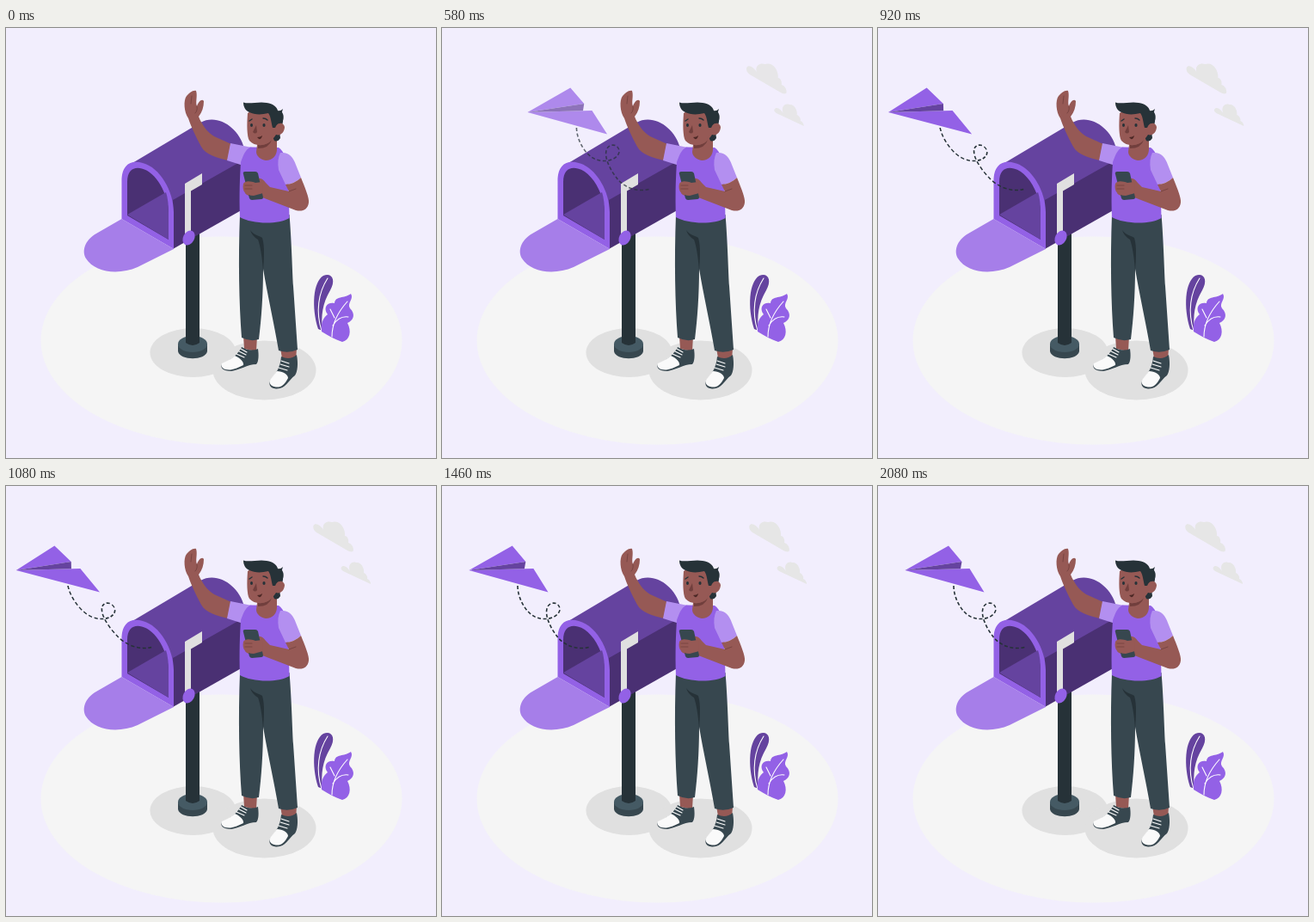
These frames come from a looping animation (500 px wide and 500 px high, 2.12 s). An HTML page:

```html
<!DOCTYPE html>
<html lang="en">
<head>
<meta charset="utf-8">
<style>
html, body { margin: 0; width: 100%; height: 100%; overflow: hidden; background: #f2eefd; }
svg { display: block; width: 100vw; height: 100vh; }
.base { fill: #9361e6; } .mid { fill: #65439f; } .deep { fill: #4a3073; } .pale { fill: #a67ee9; }
.ink { fill: #263238; } .slate { fill: #37474f; } .steel { fill: #455a64; }
.skin { fill: #965955; } .shade { fill: #713f3d; }
.white { fill: #fafafa; } .grey { fill: #e0e0e0; } .sleeve { fill: #b38ff0; }
.line { fill: none; stroke: #fff; stroke-width: 1.1; stroke-linecap: round; }
.thin { fill: none; stroke: #713f3d; stroke-width: .8; stroke-linecap: round; }
.hairline { fill: none; stroke: #263238; stroke-width: 1.4; stroke-linecap: round; }
</style>
</head>
<body>
<svg viewBox="0 0 500 500">
  <ellipse cx="250.5" cy="363.5" rx="210" ry="121" fill="#f5f5f5"/>
  <ellipse class="grey" cx="217.500" cy="377.500" rx="50" ry="28.500"/>
  <ellipse class="grey" cx="300.500" cy="398" rx="60" ry="34.500"/>

  <g id="clouds" fill="#e6e6e6">
    <path d="M357.500 46C360 42 366 46 369 51C367 44 373 40 379 42C388 39 395 49 394 58C397 58 399 63 398 66C402 67 405 72 403.500 76C401 77 399 76 397 75L361 54C357 51 357 48 357.500 46Z"/>
    <path d="M389.500 95C392 90 398 95 400 99C397 92 402 87 407 89C413 88 417 96 416 101C419 102 421 106 420 108C423 109 424 112 424 114L392 99Q389 97 389.500 95Z"/>
  </g>

  <!-- plant -->
  <path class="mid" d="M363 350C355 325 357 295 369 288C379 284 384 293 377 305C368 320 366 335 368 352Z"/>
  <path class="line" d="M367 352C360 330 363 308 374 291"/>
  <path class="base" d="M367 353C366 342 369 337 374 333C368 325 374 318 382 320C383 311 393 315 401 309C405 315 396 320 400 326C407 333 404 340 397 343C402 352 400 363 391 365C382 362 375 358 367 353Z"/>
  <path class="line" d="M379 359C379 343 387 329 397 318M382 337L377 327M380 346C385 338 391 335 398 336"/>

  <!-- post -->
  <path class="slate" d="M200 368V376C202 387 232 387 234 376V368Z"/>
  <ellipse class="steel" cx="217" cy="367.500" rx="17" ry="9.500"/>
  <path class="ink" d="M209 230H225V366Q217 372 209 366Z"/>

  <!-- mailbox -->
  <path class="mid" d="M142 160L226 110C246 99 271 116 277 140V160L194 206L160 170Z"/>
  <path class="deep" d="M194 200L277 153V210L194 257Z"/>
  <path class="base" d="M134.500 222V178C134.500 158 146 153 159 157C179 162 195 190 195 214V257Z"/>
  <path class="deep" d="M141 218V179C141 165 149 161 158 163.500C174 167 189 193 189 215V246Z"/>
  <path class="mid" d="M141 217L186 191Q189 200 189 215V246Z"/>
  <path class="pale" d="M134.500 222L105 239C91 247 88 260 93 268C103 284 130 288 153 278L195 257Z"/>
  <path class="grey" d="M208 181L228 169V182L215 189.500V238L208 242Z"/>
  <ellipse class="base" cx="212.500" cy="244" rx="6.500" ry="9" transform="rotate(28 212.500 244)"/>

  <g id="plane">
    <path d="M88 116C88 130 97 148 110 153C125 158 137 150 137 143C136 135 127 134 123 140C118 149 126 165 133 174C140 184 155 192 172 187" fill="none" stroke="#263238" stroke-width="1.600" stroke-dasharray="4 2.600"/>
    <path class="base" d="M31.500 98L82 69.500L97.500 88ZM31.500 98L106.500 96L123.500 123.500Z"/>
    <path class="mid" d="M31.500 98L97.500 88L96 96.300Z"/>
  </g>

  <!-- shoes -->
  <path class="skin" d="M276 358H292L291 376L277 373ZM319 372H338L337 388L321 384Z"/>
  <path class="slate" d="M274 371Q284 377 293 373C294 380 294 388 291 391C281 391 271 398 262 399C252 399 249 395 251 391C262 386 270 379 274 371ZM320 382Q330 387 338 380C340 390 339 400 336 404C328 410 325 420 314 419.500C306 419 305 413 308 409C315 401 319 393 320 382Z"/>
  <path class="white" d="M266 381C273 384 277 389 276 392C270 395 265 397 261 397.500C253 398 249 394 251 390C257 387 262 385 266 381ZM315 399C322 399 328 403 328 407C324 415 320 418 314 417.500C307 417 305 412 308 408Z"/>
  <path class="line" d="M268 379L277 383M271 376L279 380M273 373L280 377M317 395L327 398M319 391L329 394M320 387L329 390"/>

  <!-- trousers -->
  <path class="slate" d="M272 217H329.500C332 245 333 285 334 300L339 374Q328 379 317 375C312 345 304 310 299 280C299 310 297 338 294 362Q284 365 274 360C271 320 270 270 272 217Z"/>
  <path class="ink" d="M284 235C288 241 294 241 298 244C301 254 300 268 299 283C298 268 296 254 293 246Q286 242 284 235Z"/>

  <!-- body -->
  <path class="skin" d="M262 135L258 154C245 151 232 147 227 138C220 125 215 114 212 105C207 98 206 84 210 79C213 76 217 72 221 73C223 79 220 86 222 91C224 85 228 82 230 85C230 92 228 98 224 103C228 113 234 121 242 126Z"/>
  <path class="thin" d="M216 79L215 88M222 91Q223 96 220 99"/>
  <path class="sleeve" d="M261 134L286 139L276 160L257 154Z"/>
  <path class="base" d="M284 138.500L317 139C323 143 328 155 328 165L329.500 221C316 229 286 228 272 220C271 195 272 172 273 156C276 148 278 142 284 138.500Z"/>
  <path class="sleeve" d="M319 145C329 144 334 150 337 159L343 174Q336 181 325 182L317 165Q315 153 319 145Z"/>
  <path class="skin" d="M293 128H315V141C315 148 310 154 302 154C296 153 291 149 291 144Z"/>
  <path class="shade" d="M293 136Q304 137 309 130Q306 140 293 140Z"/>
  <path class="skin" d="M325 182Q336 181 343 174C347 184 353 198 352 203C351 211 345 214 337 212L298 197C290 198 281 196 278 192L292 175Q298 174 302 180L307 185L329 190Z"/>
  <path class="slate" d="M278 167L290 167Q292 167 293 169L299 197Q299 199 297 199L286 200Q284 200 283 198L276 170Q275 167 278 167Z"/>
  <path class="skin" d="M276 181C278 177 285 178 290 180L298 179L299 192L288 195C279 195 274 190 276 181Z"/>
  <path class="thin" d="M278 183L286 183M278 187L286 187M329 190L337 187"/>

  <!-- head -->
  <path class="ink" d="M305 97L322 104C323 112 319 116 318 120L319 128Q316 133 312 131L306 118Z"/>
  <path class="skin" d="M281 99C280 112 280 126 283 131C289 138 300 137 305 133C310 130 312 127 314 124C319 126 324 121 324 115C323 110 317 109 314 113L312 98L291 93Z"/>
  <path class="ink" d="M276 86.500C283 89 294 85 303 87C311 88 315 92 316 96Q319 97 322 94Q321 97 321 98C324 102 323 110 318 111Q315 111 313 116L310 116C308 108 308 103 305 99C297 101 289 101 283 98C278 96 276 91 276 86.500Z"/>
  <path class="shade" d="M291 113L287 121Q290 124 292 121Z"/>
  <path class="hairline" d="M283 108L286 106M299 105Q302 105 304 107"/>
  <ellipse class="ink" cx="285.500" cy="113" rx="1.500" ry="2"/>
  <ellipse class="ink" cx="300" cy="113" rx="1.600" ry="2.100"/>
  <path d="M292 127Q296 127 298 125Q297 130 294 129Z" fill="#4d2826"/>
</svg>
<script>
const LOOP = 2120, plane = document.getElementById("plane"), clouds = document.getElementById("clouds");
const mix = (a, b, p) => a + (b - a) * p;
const bez = (s, a, b) => 3 * (1 - s) ** 2 * s * a + 3 * (1 - s) * s * s * b + s ** 3;

// cubic-bezier(.36, -.01, .5, 1.38), a soft start that overshoots
function ease(x) {
  if (x <= 0) return 0;
  if (x >= 1) return 1;
  let lo = 0, hi = 1;
  for (let i = 0; i < 24; i++) {
    const s = (lo + hi) / 2;
    if (bez(s, .36, .5) < x) lo = s; else hi = s;
  }
  return bez(lo, -.01, 1.38);
}

function place(el, x, skew, opacity) {
  el.setAttribute("transform", `translate(${x + 102} 130) skewX(${skew}) translate(-102 -130)`);
  el.setAttribute("opacity", Math.max(0, Math.min(1, opacity)));
}

function draw(t) {
  const slide = ease(t / 1000);
  place(clouds, mix(-28, 0, slide), 0, slide);

  const enter = ease(t / 1200), settle = ease((t - 1200) / 400);
  const skew = t < 1200 ? mix(-20, 10, enter) : mix(10, 0, settle);
  place(plane, mix(240, 0, enter), skew, enter);
}

const start = performance.now();
function tick() {
  draw((performance.now() - start) % LOOP);
  requestAnimationFrame(tick);
}
tick();
</script>
</body>
</html>
```
